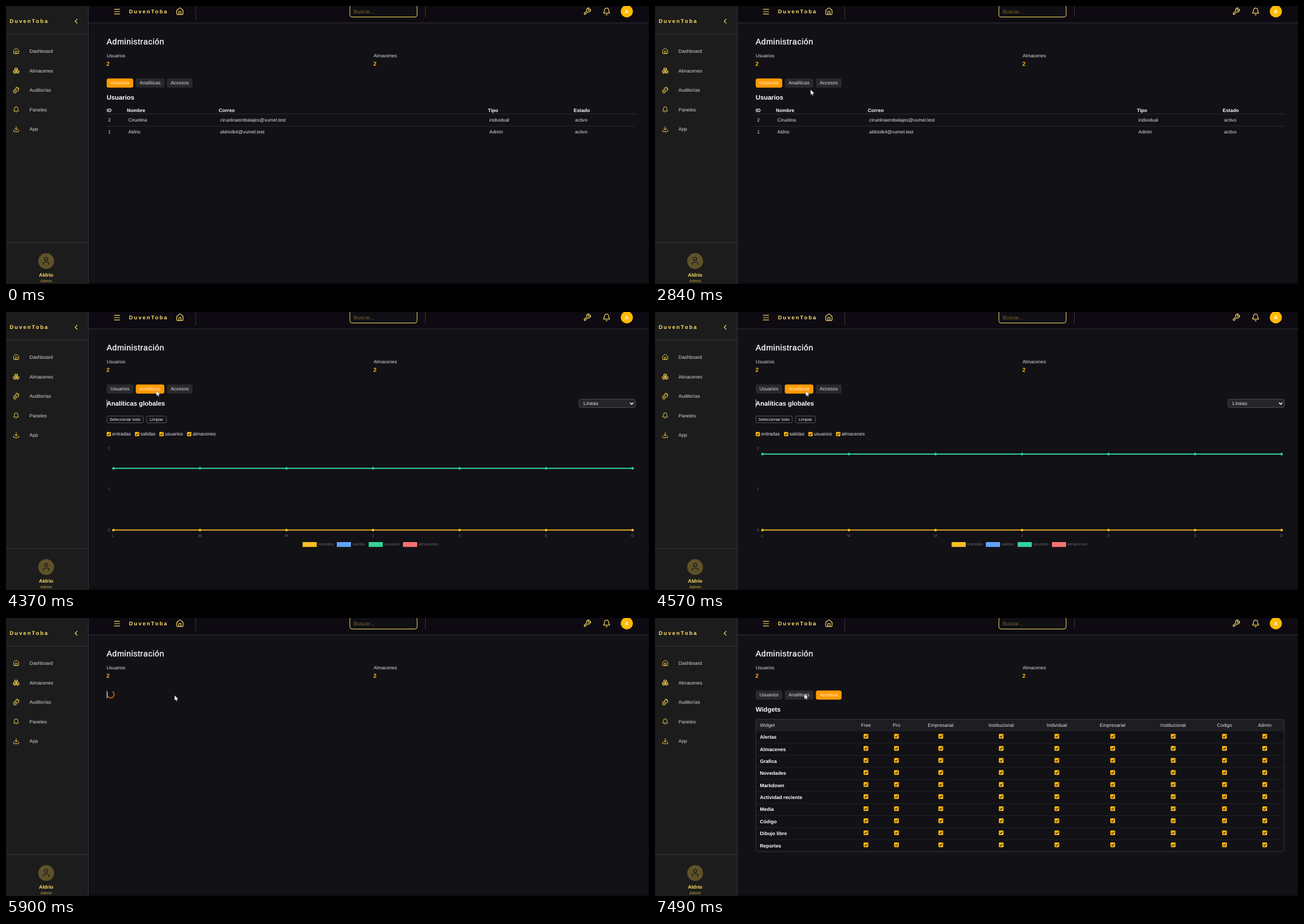
These frames come from a looping animation (1137x493 px, 8 s). An HTML page:

```html
<!DOCTYPE html>
<html lang="es">
<head>
<meta charset="utf-8">
<title>Administración</title>
<style>
  html, body { margin: 0; width: 100%; height: 100%; overflow: hidden; background: #121116; }
  svg { display: block; width: 100vw; height: 100vh; }
  text { font-family: "Liberation Sans", Arial, sans-serif; text-rendering: geometricPrecision; white-space: pre; }
  .icon { fill: none; stroke-width: 2; stroke-linecap: round; stroke-linejoin: round; }

  /* Everything shares one 8 s clock */
  .step { animation: 8s step-end infinite; }
  #users { animation-name: users; }
  #loading { animation-name: loading; }
  #stats { animation-name: stats; }
  #statsBody { animation-name: statsBody; }
  #chart { animation-name: chart; }
  #access { animation-name: access; }
  #accessBody { animation-name: accessBody; }
  #caret { animation-name: caret; }
  #pointer { animation-name: enter; }
  #spin { transform-origin: 185px 135.5px; animation: spin 1s linear infinite; }
  #rise { animation: rise 8s linear infinite; }
  #path { animation: path 8s linear infinite; }

  @keyframes users { 0% { opacity: 1 } 39.75%, 100% { opacity: 0 } }
  @keyframes loading { 0% { opacity: 0 } 39.75% { opacity: 1 } 45.5% { opacity: 0 } 71.25% { opacity: 1 } 77.875%, 100% { opacity: 0 } }
  @keyframes stats { 0% { opacity: 0 } 45.5% { opacity: 1 } 71.25%, 100% { opacity: 0 } }
  @keyframes statsBody { 0% { opacity: 0 } 48% { opacity: 1 } 71.25%, 100% { opacity: 0 } }
  @keyframes chart { 0% { opacity: 0 } 52.25% { opacity: 1 } 71.25%, 100% { opacity: 0 } }
  @keyframes access { 0% { opacity: 0 } 77.875%, 100% { opacity: 1 } }
  @keyframes accessBody { 0% { opacity: 0 } 80.375%, 100% { opacity: 1 } }
  @keyframes enter { 0% { opacity: 0 } 8%, 100% { opacity: 1 } }
  @keyframes caret {
    0% { opacity: 0; transform: none }
    54.625% { opacity: 1; transform: none }
    61.25% { opacity: 0; transform: none }
    67.875% { opacity: 1; transform: none }
    71.25% { opacity: 1; transform: translateY(-26px) }
    77.875% { opacity: 1; transform: none }
    80.375% { opacity: 0; transform: none }
    87% { opacity: 1; transform: none }
    93.625%, 100% { opacity: 0; transform: none }
  }
  @keyframes spin { from { transform: rotate(-19deg) } to { transform: rotate(341deg) } }
  @keyframes rise {
    0%, 50.95% { transform: translateY(144.7px); animation-timing-function: cubic-bezier(.25, 1, .5, 1) }
    63.45%, 100% { transform: none }
  }
  @keyframes path {
    0%, 8% { transform: translate(1050px, 477px) }
    8.875% { transform: translate(900px, 415px) }
    9.625% { transform: translate(740px, 338px) }
    10.5% { transform: translate(590px, 292px) }
    11.25% { transform: translate(512px, 305px) }
    12.125%, 16.375% { transform: translate(492px, 327px) }
    20.5% { transform: translate(492px, 317px) }
    23%, 24.75% { transform: translate(493px, 316px) }
    26.375% { transform: translate(400px, 298px) }
    28%, 31.375% { transform: translate(333px, 307px) }
    35.5% { transform: translate(275px, 148px) }
    38%, 52.25% { transform: translate(265px, 139px) }
    62.125%, 64.625% { transform: translate(268px, 140.5px) }
    67.875%, 77.875% { transform: translate(298px, 137px) }
    81.125% { transform: translate(290px, 136px) }
    85.25%, 100% { transform: translate(264px, 134.5px) }
  }
</style>
</head>
<body>
<svg id="stage" viewBox="0 0 1137 493" preserveAspectRatio="none"></svg>
<script>
const YELLOW = '#ffe066', AMBER = '#ffb900', ORANGE = '#ff9a00', LIGHT = '#e2e2e4', LINE = '#2c2b31';
const BRAND = 'DuvenToba', USER = 'Aldrio';

// Text whose capitals are centred on y
const text = (x, y, str, size = 8.4, fill = LIGHT, extra = '') =>
  `<text x="${x}" y="${(y + size * .35).toFixed(2)}" font-size="${size}" fill="${fill}" ${extra}>${str}</text>`;
const bold = (x, y, str, size = 8.6, fill = '#fff', extra = '') =>
  text(x, y, str, size, fill, 'font-weight="700" ' + extra);
const MID = 'text-anchor="middle"';
const rect = (x, y, w, h, fill, rx = 0, stroke = 'none') =>
  `<rect x="${x}" y="${y}" width="${w}" height="${h}" rx="${rx}" fill="${fill}" stroke="${stroke}"/>`;
const hline = (x1, x2, y, color = LINE) => rect(x1, y, x2 - x1, 1, color);
const group = (id, body) => `<g id="${id}" class="step">${body}</g>`;

const cube = (x, y) => `<path transform="translate(${x} ${y})" d="M0-5.6 5-2.8V2.8L0 5.6-5 2.8V-2.8ZM0 0V5.6M-5-2.8 0 0 5-2.8"/>`;
const stroke = d => `<path d="${d}"/>`;
const ICONS = {
  home: stroke('M15 21v-8a1 1 0 0 0-1-1h-4a1 1 0 0 0-1 1v8M3 10a2 2 0 0 1 .7-1.5l7-6a2 2 0 0 1 2.6 0l7 6A2 2 0 0 1 21 10v9a2 2 0 0 1-2 2H5a2 2 0 0 1-2-2z'),
  boxes: cube(7, 16.2) + cube(17, 16.2) + cube(12, 7.8),
  files: stroke('M21 7h-3a2 2 0 0 1-2-2V2M21 6v6.5a1.5 1.5 0 0 1-1.5 1.5h-7a1.5 1.5 0 0 1-1.5-1.5v-9A1.5 1.5 0 0 1 12.500 2H17ZM7 8v8.800a1.200 1.200 0 0 0 1.200 1.200H15M3 12v8.800a1.200 1.200 0 0 0 1.200 1.200H11'),
  bell: stroke('M10.300 21a2 2 0 0 0 3.400 0M3.300 15.300A1 1 0 0 0 4 17h16a1 1 0 0 0 .7-1.700C19.400 14 18 12.500 18 8A6 6 0 0 0 6 8c0 4.500-1.400 6-2.700 7.300'),
  download: stroke('M21 15v4a2 2 0 0 1-2 2H5a2 2 0 0 1-2-2v-4M7 10l5 5 5-5M12 15V3'),
  menu: stroke('M4 5h16M4 12h16M4 19h16'),
  back: stroke('M15 18 9 12l6-6'),
  wrench: stroke('M14.700 6.300a1 1 0 0 0 0 1.400l1.600 1.600a1 1 0 0 0 1.400 0l3.800-3.800a6 6 0 0 1-8 8l-6.900 6.900a2.100 2.100 0 0 1-3-3l6.900-6.900a6 6 0 0 1 8-8z'),
  user: stroke('M19 21v-2a4 4 0 0 0-4-4H9a4 4 0 0 0-4 4v2') + '<circle cx="12" cy="7" r="4"/>'
};
const icon = (name, x, y, size = 14.4, color = YELLOW) =>
  `<g class="icon" stroke="${color}" transform="translate(${x} ${y}) scale(${size / 24}) translate(-12 -12)">${ICONS[name]}</g>`;

const checkbox = (x, y, s) => rect(x - s / 2, y - s / 2, s, s, '#fdb813', 1.3) +
  `<path d="M${x - s * .27} ${y + s * .02}l${s * .19} ${s * .2} ${s * .36}-${s * .42}" fill="none" stroke="#1b1710" stroke-width="1.2"/>`;

function sidebar() {
  const items = [['home', 'Dashboard'], ['boxes', 'Almacenes'], ['files', 'Auditorías'], ['bell', 'Paneles'], ['download', 'App']];
  return rect(0, 0, 145, 493, '#1c1c1c') + rect(145, 0, 1, 493, '#37363b') +
    hline(0, 145, 49.5, '#37363b') + hline(0, 145, 419, '#37363b') +
    bold(6.5, 27, BRAND, 9.5, YELLOW, 'letter-spacing="2"') + icon('back', 124, 27) +
    items.map(([name, label], i) => {
      const y = 80 + i * 34.6;
      return icon(name, 18, y, 12, '#fbd44e') + text(41.5, y, label, 8.5, '#d6d6d6');
    }).join('') +
    '<circle cx="71" cy="452.300" r="14" fill="#5e5229"/>' + icon('user', 71, 452, 17, '#1c1c1c') +
    bold(71, 476.5, USER, 8.8, YELLOW, MID) + text(71, 487, 'Admin', 7.3, '#c4a63c', MID);
}

function header() {
  return rect(146, 0, 991, 30, '#0d0a11') + hline(146, 1137, 29.5, '#37363b') +
    icon('menu', 196.3, 10) + bold(217.5, 10, BRAND, 9.5, YELLOW, 'letter-spacing="2"') +
    icon('home', 307.5, 9.5, 14.8) + rect(335, 0, 1, 24, '#3a393e') + rect(741, 0, 1, 20, '#3a393e') +
    rect(608, -2, 119, 21.5, '#100f13', 4, YELLOW) + text(615, 10, 'Buscar...', 9.2, '#786a32') +
    icon('wrench', 1027.7, 9.5) + icon('bell', 1062, 9.7) +
    `<circle cx="1097.800" cy="9.500" r="10.700" fill="${AMBER}"/>` + bold(1097.8, 9.8, 'A', 9.5, '#fff', MID);
}

const summary = () =>
  text(178, 63, 'Administración', 14.2, '#fff', 'letter-spacing=".65" stroke="#fff" stroke-width=".35"') +
  [['Usuarios', 178], ['Almacenes', 650]].map(([label, x]) =>
    text(x, 88, label, 8.4, '#dcdcde') + bold(x - .5, 102, '2', 10.2, AMBER)).join('');

const tabs = active => [['Usuarios', 178, 47], ['Analíticas', 229.5, 50.5], ['Accesos', 284.5, 45.5]]
  .map(([label, x, w], i) => rect(x, 128.5, w, 16.3, i === active ? ORANGE : '#29292c', 3.5) +
    text(x + w / 2, 136.5, label, 8.5, i === active ? '#fff0d0' : '#dcdcde', MID)).join('');
const heading = str => bold(178, 162, str, 11.4);

function usersView() {
  const cols = [178, 213.8, 376.3, 852.3, 1003.8];
  const rows = [
    ['2', 'Ciruelina', 'ciruelinaembalajes@vumel.test', 'individual', 'activo'],
    ['1', USER, 'aldriotk4@vumel.test', 'Admin', 'activo']
  ];
  return tabs(0) + heading('Usuarios') +
    ['ID', 'Nombre', 'Correo', 'Tipo', 'Estado'].map((s, i) => bold(cols[i], 185, s)).join('') +
    rows.map((row, r) => hline(178, 1113, 191 + r * 21.5) +
      row.map((s, i) => text(cols[i] + 2.5, 201.7 + r * 21.5, s)).join('')).join('');
}

function statsBody() {
  const button = (x, w, label) => rect(x + .5, 184.5, w - 1, 12, '#121116', 2, '#57565c') +
    text(x + w / 2, 190.5, label, 7.4, '#eee', MID);
  const filters = [['entradas', 178], ['salidas', 228], ['usuarios', 271.200], ['almacenes', 320.200]];
  return heading('Analíticas globales') +
    rect(1013, 154.5, 100, 15, '#26262a', 4, '#4b4a51') + text(1021, 162, 'Líneas', 8.8) +
    '<path d="M1103.500 160.700l2.900 2.900 2.900-2.900" fill="none" stroke="#fff" stroke-width="1.500"/>' +
    button(178, 65, 'Seleccionar todo') + button(248, 36, 'Limpiar') +
    filters.map(([s, x]) => checkbox(x + 3.8, 216.5, 7.6) + text(x + 9.7, 216.5, s, 8.5)).join('');
}

function chart() {
  const xs = [...'LMMJVSD'].map((_, i) => 190 + i * 153);
  const series = (y, color) => `<path d="M190 ${y}H1108" stroke="${color}" stroke-width="1.800"/>` +
    xs.map(x => `<circle cx="${x}" cy="${y}" r="2.200" fill="${color}"/>`).join('');
  const legend = [['entradas', 524.5, '#fbbf24'], ['salidas', 585, '#60a5fa'], ['usuarios', 641.3, '#34d399'], ['almacenes', 702, '#f87171']];
  const gray = '#66656a';
  return [2, 1, 0].map((n, i) => text(184, 241.5 + i * 72.3, n, 7.1, gray, 'text-anchor="end"')).join('') +
    [...'LMMJVSD'].map((d, i) => text(xs[i], 397, d, 7.1, gray, MID)).join('') +
    `<g id="rise">${series(242, '#34d399')}</g>` + series(386.7, '#fbbf24') +
    legend.map(([s, x, c]) => rect(x, 408, 25, 8.6, c) + text(x + 27.5, 411.8, s, 7.2, gray)).join('');
}

function accessBody() {
  const cols = [['Free', 373], ['Pro', 427], ['Empresarial', 505.3], ['Institucional', 612.2], ['Individual', 710.6],
    ['Empresarial', 809.3], ['Institucional', 916.3], ['Codigo', 1007], ['Admin', 1078.2]];
  const rows = ['Alertas', 'Almacenes', 'Grafica', 'Novedades', 'Markdown', 'Actividad reciente', 'Media', 'Código', 'Dibujo libre', 'Reportes'];
  return heading('Widgets') + rect(178.5, 179.5, 934, 21, '#1e1e22', 4) + rect(179, 197, 933, 4, '#1e1e22') +
    text(185.5, 190, 'Widget', 8.5) + cols.map(([s, x]) => text(x, 190, s, 8.5, LIGHT, MID)).join('') +
    rows.map((s, r) => {
      const y = 209.8 + r * 21.38;
      return (r ? hline(179, 1112, y - 9.5, '#242329') : '') + bold(185.5, y + 1.3, s, 8.7) +
        cols.map(c => checkbox(c[1], y, 8.4)).join('');
    }).join('') +
    rect(178.5, 179.5, 934, 234.8, 'none', 4, '#3a393f');
}

document.getElementById('stage').innerHTML =
  rect(146, 30, 991, 463, '#121116') + rect(146, 490, 991, 3, '#0f0b13') + rect(1135, 30, 2, 463, '#0f0b13') +
  header() + sidebar() + summary() +
  group('users', usersView()) +
  group('stats', tabs(1)) + group('statsBody', statsBody()) + group('chart', chart()) +
  group('access', tabs(2)) + group('accessBody', accessBody()) +
  group('loading', '<circle id="spin" cx="185" cy="135.500" r="6.200" fill="none" stroke="#d9780c" stroke-width="1.600" pathLength="4" stroke-dasharray="3 1"/>') +
  group('caret', rect(178, 155, 1, 14, '#cfcfcf')) +
  group('pointer', '<path id="path" d="M0 0V9.500L2.200 7.500 3.700 10.800 5.300 10.100 3.900 6.900H7Z" fill="#fff" stroke="#111" stroke-width=".4"/>');
</script>
</body>
</html>
```
